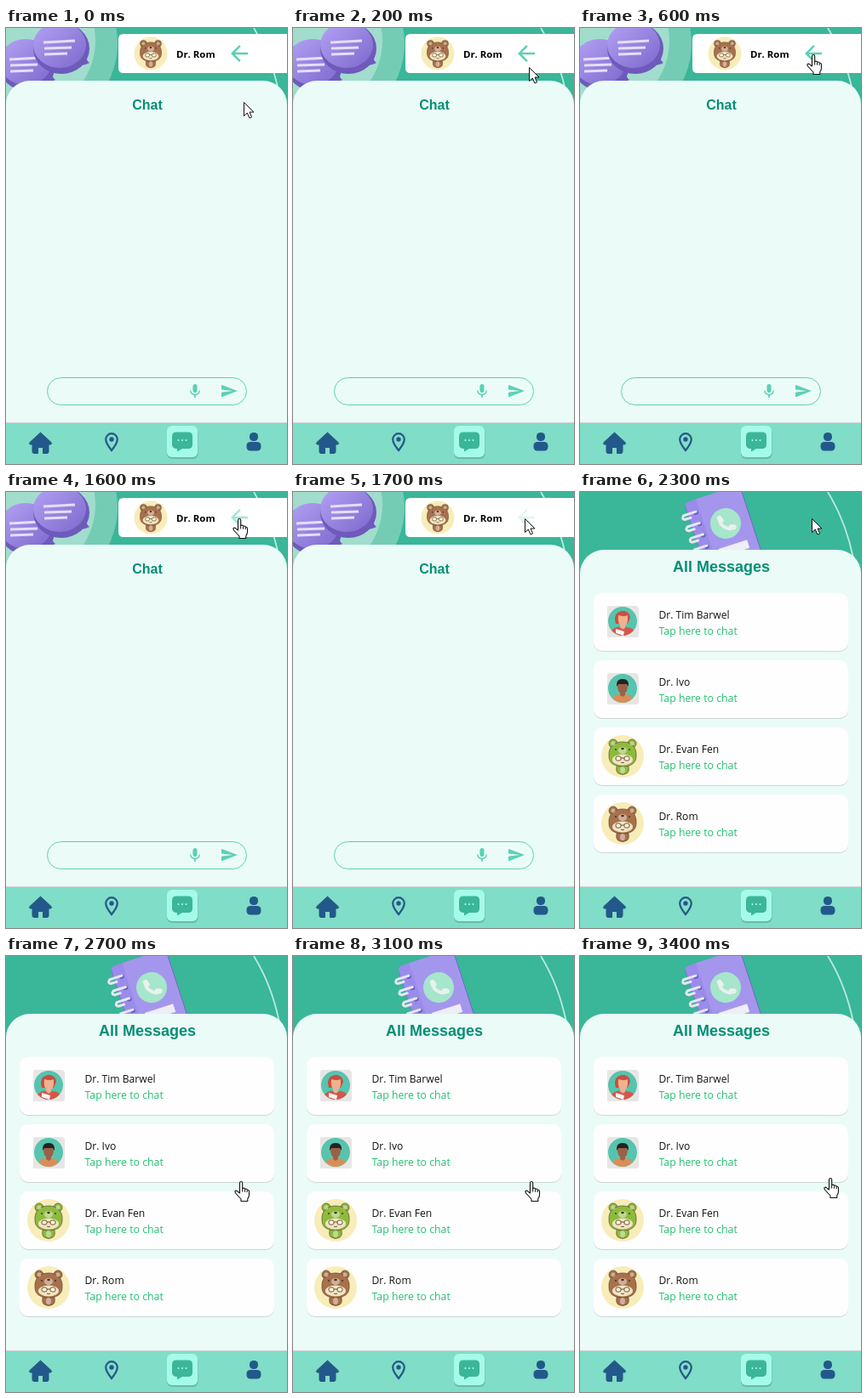
Animation of 330x513 px, one loop 3.5 s. Source, as an HTML page:

```html
<!DOCTYPE html>
<html lang="en">
<head>
<meta charset="utf-8">
<title>Chat app</title>
<style>
  html, body { margin: 0; width: 100%; height: 100%; overflow: hidden; }
  svg { display: block; }
  text { font: 12.1px "Open Sans", "Noto Sans", sans-serif; fill: #111; }
  .title { font: bold 16px "Liberation Sans", Arial, sans-serif; fill: #048f75; text-anchor: middle; }
  .hint { font-size: 12.3px; font-weight: 500; fill: #25c072; }
  .teal { fill: #5bd0b5; }
  .nav { fill: #23588a; }
</style>
</head>
<body>
<svg width="330" height="513" viewBox="0 0 330 513">
  <defs>
    <linearGradient id="violet" x1="0" y1="0" x2="1" y2="1">
      <stop offset="0" stop-color="#b5a3f5"/><stop offset="1" stop-color="#7c68cc"/>
    </linearGradient>
    <clipPath id="round"><circle r="25"/></clipPath>

    <g id="bubble">
      <g fill="#6e5abb"><ellipse cx="1" cy="1" rx="33" ry="30"/><path d="M30 3Q29 15 34 18 26 22 14 21z"/></g>
      <ellipse cx="-1" cy="-3" rx="31" ry="27" fill="url(#violet)"/>
      <path stroke="#e4def9" stroke-width="3" d="M-20-6l37-2M-19 1l32-1M-19 8l27-1"/>
    </g>

    <g id="animal">
      <circle r="25" fill="#f8ecb9"/>
      <g fill="currentColor" stroke="#5b4a30" stroke-width=".7">
        <circle cx="-11" cy="-15" r="5"/><circle cx="11" cy="-15" r="5"/>
        <path d="M-6 8Q-9 18-5 20 0 23 5 20 9 18 6 8z"/>
        <path d="M-16 0C-17-12-9-17 0-17S17-12 16 0C16 9 8 12 0 12S-16 9-16 0z"/>
      </g>
      <g fill="#fff" opacity=".45">
        <circle cx="-11" cy="-15" r="2.400"/><circle cx="11" cy="-15" r="2.400"/>
        <ellipse cy="-7" rx="5" ry="4"/><ellipse cy="16" rx="3" ry="4"/>
      </g>
      <g fill="#43331f"><ellipse cy="-9" rx="1.800" ry="1.300"/><circle cx="-8" cy="-8" r="1"/><circle cx="8" cy="-8" r="1"/></g>
      <ellipse cy="4" rx="12" ry="6.500" fill="#f4e3c0"/>
      <g fill="#fffbe9" stroke="#6a5436"><rect x="-8" y="0" width="6" height="5" rx="2"/><rect x="2" y="0" width="6" height="5" rx="2"/></g>
      <path fill="none" stroke="#6a5436" d="M-2 2h4M-2 7q2 1.500 4 0"/>
    </g>

    <g id="woman" clip-path="url(#round)">
      <rect x="-18" y="-19" width="37" height="37" rx="1" fill="#e8e6e4"/>
      <circle cy="-1" r="17" fill="#56c4ae"/>
      <path fill="#c6503e" d="M-9-3C-10-15 8-17 9-5L6 2H-8z"/>
      <path fill="#f0b091" d="M-5-8Q2-6 6-8V-2Q5 4 3 4V8H-3V3Q-6 1-5-8z"/>
      <path fill="#d4574a" d="M-13 10Q-8 5-3 6L0 9 4 6Q11 6 13 10 7 16 0 16T-13 10z"/>
      <path fill="#f4f4f4" d="M-8 8l10 3-1 5-9-3z"/>
    </g>
    <g id="man" clip-path="url(#round)">
      <rect x="-18" y="-19" width="37" height="37" rx="1" fill="#e8e6e4"/>
      <circle cy="-1" r="17" fill="#56c4ae"/>
      <path fill="#d98e58" d="M-12 10Q-8 6-3 6H3Q8 6 12 10 7 16 0 16T-12 10z"/>
      <path fill="#9a6146" d="M-6-6H6Q6 3 3 4V7L0 9-3 7V4Q-6 3-6-6z"/>
      <path fill="#252326" d="M-7-3Q-8-12 0-12T7-3L5-6H-5z"/>
    </g>

    <g id="arrow"><path fill="#fff" stroke="#111" d="M.5.5V16.5L4.3 13 7 19l2.6-1.2L7 12h5z"/></g>
    <g id="hand">
      <path fill="#fff" stroke="#111" stroke-width="1.100" stroke-linejoin="round"
        d="M6.500 14V2.300q0-1.800 1.600-1.800t1.600 1.800V8.500q2.800-1 3 .8 2.400-.8 2.600 1 2.200-.3 2.200 1.700v4q0 2.500-1.700 4.500V23.500H8V21L2 14.500Q0 12 1.500 11.300T4.500 12.500z"/>
      <path stroke="#111" d="M9.700 8.500v4M12.600 9.500v3.200M15.200 10.500v2.500"/>
    </g>
  </defs>

  <rect width="330" height="513" fill="#3ab699"/>
  <path fill="none" stroke="#b9eadd" stroke-width="1.800" d="M291 0Q312 34 321 78"/>

  <g id="chat">
    <circle cx="31" cy="18" r="100" fill="#74ccb5"/>
    <circle cx="20" cy="15" r="85" fill="#a1dccd"/>
    <use href="#bubble" x="24" y="43"/>
    <use href="#bubble" x="64" y="23"/>
    <path fill="#fff" d="M330 7H138q-6 0-6 6v34q0 6 6 6H330z"/>
    <use href="#animal" color="#a8704c" transform="translate(170 30) scale(.78)"/>
    <text x="200" y="35" style="font-size:11.4px;font-weight:700;fill:#000">Dr. Rom</text>
    <path id="back" class="teal" transform="translate(259 15) scale(1.25)"
      d="M20 11H7.830l5.590-5.590L12 4l-8 8 8 8 1.410-1.410L7.830 13H20z"/>
    <rect y="62" width="330" height="450" rx="28" fill="#ebfbf8"/>
    <text class="title" x="166" y="96">Chat</text>
    <rect x="48.500" y="411.500" width="234" height="32" rx="16" fill="none" stroke="#5bd0b5"/>
    <path class="teal" transform="translate(211.900 417.300) scale(.84)"
      d="M12 14a3 3 0 0 0 3-3V5a3 3 0 0 0-6 0v6a3 3 0 0 0 3 3zm5.300-3a5.300 5.100 0 0 1-10.600 0H5a7 7 0 0 0 6 6.700V21h2v-3.300A7 7 0 0 0 19 11z"/>
    <path class="teal" transform="translate(251.200 417.500) scale(.9 .8)" d="M2 21 23 12 2 3v7l15 2-15 2z"/>
  </g>

  <g id="inbox">
    <g transform="translate(171 37) rotate(-18)">
      <rect x="-39" y="-36" width="69" height="110" rx="5" fill="#7564c6"/>
      <rect x="-38.500" y="-38" width="67.500" height="110" rx="5" fill="#9a8cec"/>
      <path fill="#a596ed" d="M-24-38H25q4 0 4 4V72H-24z"/>
      <path stroke="#6d5ab9" stroke-width="5" stroke-linecap="round" d="M-30-23h1m-1 14h1m-1 14h1m-1 14h1"/>
      <path fill="none" stroke="#e6e6f0" stroke-width="3" stroke-linecap="round"
        d="M-29-24h-15q-4 3 0 5h7M-29-10h-15q-4 3 0 5h7M-29 4h-15q-4 3 0 5h7M-29 18h-15q-4 3 0 5h7"/>
      <circle r="18" fill="#a6e6cb"/>
      <path fill="none" stroke="#e9f1ee" stroke-width="4" stroke-linecap="round" d="M-5-8Q-8 0 0 6q4 3 8 1"/>
      <path stroke="#e9f1ee" stroke-width="6" stroke-linecap="round" d="M-5-8l1 3M5 6l3 1"/>
      <rect x="-17" y="26" width="35" height="10" fill="#efeef4"/>
    </g>
    <rect y="68" width="330" height="450" rx="28" fill="#ebfbf8"/>
    <text class="title" x="166" y="94" style="font-size:18px">All Messages</text>
    <g id="cards"></g>
  </g>

  <rect y="464" width="330" height="49" fill="#80ddc7"/>
  <rect y="464" width="330" height="1" fill="#ccd0ce"/>
  <path class="nav" stroke="#23588a" stroke-linejoin="round"
    d="M40.500 476 53 487.500q1.500 2.500-1.500 2.500H50v8.500q0 2-2 2h-4.500v-7h-6v7H33q-2 0-2-2V490h-1.500q-3 0-1.500-2.500z"/>
  <path fill="none" stroke="#23588a" stroke-width="2.200" d="M124 497c-4-5-6.800-9-6.800-13a6.800 6.800 0 0 1 13.600 0c0 4-2.800 8-6.800 13z"/>
  <circle class="nav" cx="124" cy="484" r="2.700"/>
  <rect x="189" y="470" width="36.500" height="37" rx="6" fill="#5fa899" opacity=".65"/>
  <rect x="189" y="468" width="36" height="37" rx="6" fill="#a5fbe8"/>
  <path fill="#3cb698" d="M200 475.500h14q5 0 5 5V490q0 5-5 5h-7l-6 3.500V495q-6 0-6-5V480.500q0-5 5-5z"/>
  <path stroke="#a5fbe8" stroke-width="2.200" stroke-linecap="round" d="M202.500 485h0m4.500 0h0m4.500 0h0"/>
  <rect class="nav" x="286" y="476" width="10" height="10" rx="4.500"/>
  <rect class="nav" x="282.500" y="487" width="17" height="10.500" rx="4.500"/>

  <use id="cursor"/>
</svg>
<script>
const $ = id => document.getElementById(id);
const LOOP = 3500, OPEN_INBOX = 1900, LOADED = 2300;

const doctors = [
  ["Dr. Tim Barwel", "woman"],
  ["Dr. Ivo", "man"],
  ["Dr. Evan Fen", "animal", "#8dbb3c"],
  ["Dr. Rom", "animal", "#a8704c"],
];

$("cards").innerHTML = doctors.map(([name, art, color], i) => `
  <g transform="translate(0 ${i * 79})">
    <rect x="16" y="120" width="299" height="68" rx="10" fill="#cbd8d5"/>
    <rect x="16" y="119" width="299" height="68" rx="10" fill="#fefefe"/>
    <circle class="blank" cx="50" cy="153" r="25" fill="#bbb"/>
    <use class="photo" href="#${art}" x="50" y="153" color="${color || "#000"}"/>
    <text x="92.500" y="149">${name}</text>
    <text class="hint" x="92.500" y="168">Tap here to chat</text>
  </g>`).join("");

// Pointer samples: time, x, y, shape
const pointer = [
  [0, 279, 87, "arrow"], [100, 279, 66, "arrow"], [200, 277, 46, "arrow"],
  [300, 266, 32, "hand"], [600, 266, 31, "hand"], [1700, 272, 31, "arrow"],
  [2400, 283, 75, "arrow"], [2500, 302, 180, "hand"], [2600, 296, 245, "hand"],
  [2700, 268, 265, "hand"], [3100, 272, 265, "hand"], [3200, 276, 264, "hand"],
  [3400, 286, 261, "hand"],
];

const show = (el, on) => { el.style.display = on ? "" : "none"; };
const blanks = document.querySelectorAll(".blank");
const photos = document.querySelectorAll(".photo");

function draw(now) {
  const t = now % LOOP;
  show($("chat"), t < OPEN_INBOX);
  show($("inbox"), t >= OPEN_INBOX);
  blanks.forEach(el => show(el, t < LOADED));
  photos.forEach(el => show(el, t >= LOADED));
  $("back").setAttribute("opacity", t < 1600 ? 1 : t < 1700 ? 0.55 : 0.2);

  const [, x, y, shape] = pointer.findLast(p => p[0] <= t);
  $("cursor").setAttribute("href", "#" + shape);
  $("cursor").setAttribute("transform", `translate(${x} ${y})`);
}

const start = performance.now();
function tick() {
  draw(performance.now() - start);
  requestAnimationFrame(tick);
}
tick();
</script>
</body>
</html>
```
